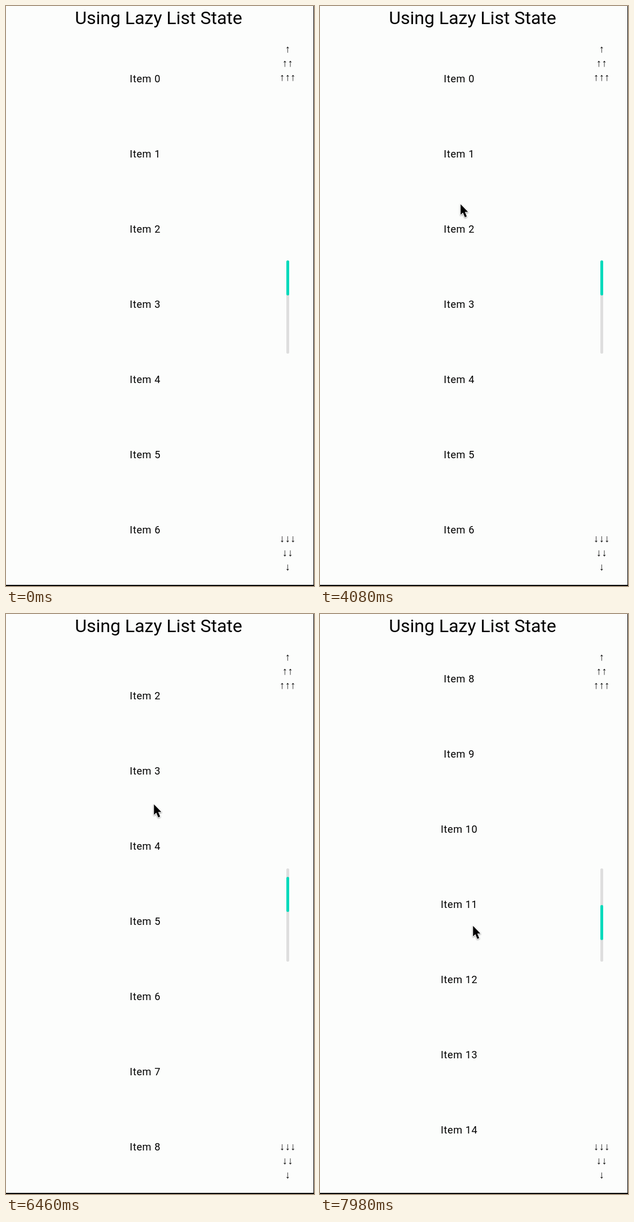
These frames come from a looping animation (546 by 1026 pixels, 8 s). An HTML page:

```html
<!DOCTYPE html>
<html lang="en">
<head>
<meta charset="utf-8">
<title>Lazy list scrolling</title>
<style>
html, body { margin: 0; width: 100%; height: 100%; overflow: hidden; background: #fcfdfc; }
body { font: 18.2px/22px Roboto, sans-serif; letter-spacing: .57px; color: #000; }
div, svg { position: absolute; }
#stage { width: 546px; height: 1026px; overflow: hidden; }
#title { left: 0; width: 541px; top: 2px; font-size: 32px; line-height: 38px; letter-spacing: 0; text-align: center; }
#view { left: 0; top: 59px; width: 480px; height: 945px; overflow: hidden; }
#list { left: 0; top: -59px; width: 493.4px; }
#list div, .arrows { width: 100%; text-align: center; white-space: nowrap; }
.arrows { left: 459.5px; width: 80px; font-family: "Liberation Sans", Arial, sans-serif; }
#track, #thumb { left: 496.5px; width: 5.5px; border-radius: 3px; top: 450px; }
#track { height: 164.5px; background: #dedede; }
#thumb { height: 62px; background: #03dabb; }
#right { left: 544.6px; top: 0; width: 2px; height: 1026px; background: #000; }
#bottom { left: 0; top: 1024px; width: 546px; height: 2px; background: #000; }
#cursor { left: 0; top: 0; overflow: visible; filter: drop-shadow(0 1.5px 1.2px rgba(0, 0, 0, .4)); }
</style>
</head>
<body>
<div id="stage">
  <div id="title">Using Lazy List State</div>
  <div id="view"><div id="list"></div></div>
  <div id="track"></div>
  <div id="thumb"></div>
  <div id="right"></div>
  <div id="bottom"></div>
  <svg id="cursor" width="20" height="30">
    <path d="M1.3 1.8V20.3L5.4 16.5L8.9 24.7L12.2 23.3L8.8 15.3H14.4Z"
      stroke="#fff" stroke-width="2" stroke-linejoin="round" paint-order="stroke"/>
  </svg>
</div>
<script>
const LOOP = 8000, ROW = 133, FIRST_ROW = 129;
const RELEASE = 140, FLING_TICKS = 80, FLING_DISTANCE = 1070;
const $ = id => document.getElementById(id);

function addLabel(parent, text, centerY, className = "") {
  const label = document.createElement("div");
  label.textContent = text;
  label.className = className;
  label.style.top = centerY - 11 + "px";
  parent.append(label);
}

for (let i = 0; i < 18; i++) addLabel($("list"), "Item " + i, FIRST_ROW + i * ROW);
for (let i = 0; i < 3; i++) {
  addLabel($("stage"), "↑".repeat(i + 1), 76 + i * 25, "arrows");
  addLabel($("stage"), "↓".repeat(3 - i), 942 + i * 25, "arrows");
}
$("stage").append($("cursor"));

const smooth = u => u * u * (3 - 2 * u);
const easeOut = u => 1 - (1 - u) ** 1.83;
const speedUp = u => u ** 2.2;

// Cursor moves: start tick, end tick, target x, target y, easing
const moves = [
  [10, 18, 193, 799, easeOut],
  [35, 41, 208, 806, smooth],
  [45, 62, 217, 814, smooth],
  [62, 89, 248, 349, easeOut],
  [99, 115, 267, 595, smooth],
  [122.7, RELEASE, 261, 335, speedUp],
  [160, 172, 270, 550, smooth]
];

// Ticks come in groups of three lasting 20, 20 and 100 ms
function tickAt(ms) {
  const t = ms + 20;
  return 3 * Math.floor(t / 140) + Math.min(2, Math.floor(t % 140 / 20));
}

function cursorAt(tick) {
  let x = 424, y = 969;
  for (const [start, end, toX, toY, ease] of moves) {
    if (tick <= start) break;
    const p = ease(Math.min(1, (tick - start) / (end - start)));
    x += (toX - x) * p;
    y += (toY - y) * p;
  }
  return [x, y];
}

// Spline decay: time and distance are both cubics of a, so solve for a by bisection
function flingFraction(time) {
  const cubic = (a, p, q) => 3 * a * (1 - a) * ((1 - a) * p + a * q) + a ** 3;
  let low = 0, high = 1;
  for (let i = 0; i < 24; i++) {
    const mid = (low + high) / 2;
    if (cubic(mid, .175, .35) < time) low = mid; else high = mid;
  }
  return cubic(low, .5, 1);
}

function scrollAt(tick, cursorY) {
  if (tick < 123) return 0;
  if (tick <= RELEASE) return Math.max(0, 585 - cursorY);
  return 249 + FLING_DISTANCE * flingFraction((tick - RELEASE) / FLING_TICKS);
}

function draw(now) {
  const tick = tickAt(now % LOOP);
  const [x, y] = cursorAt(tick);
  const scroll = Math.round(scrollAt(tick, y));
  $("cursor").style.display = tick < 10 ? "none" : "block";
  $("cursor").style.transform = `translate(${Math.round(x)}px, ${Math.round(y)}px)`;
  $("list").style.transform = `translateY(${-scroll}px)`;
  $("thumb").style.transform = `translateY(${scroll * .06}px)`;
}

const begin = performance.now();
function loop() {
  draw(performance.now() - begin);
  requestAnimationFrame(loop);
}
loop();
</script>
</body>
</html>
```
